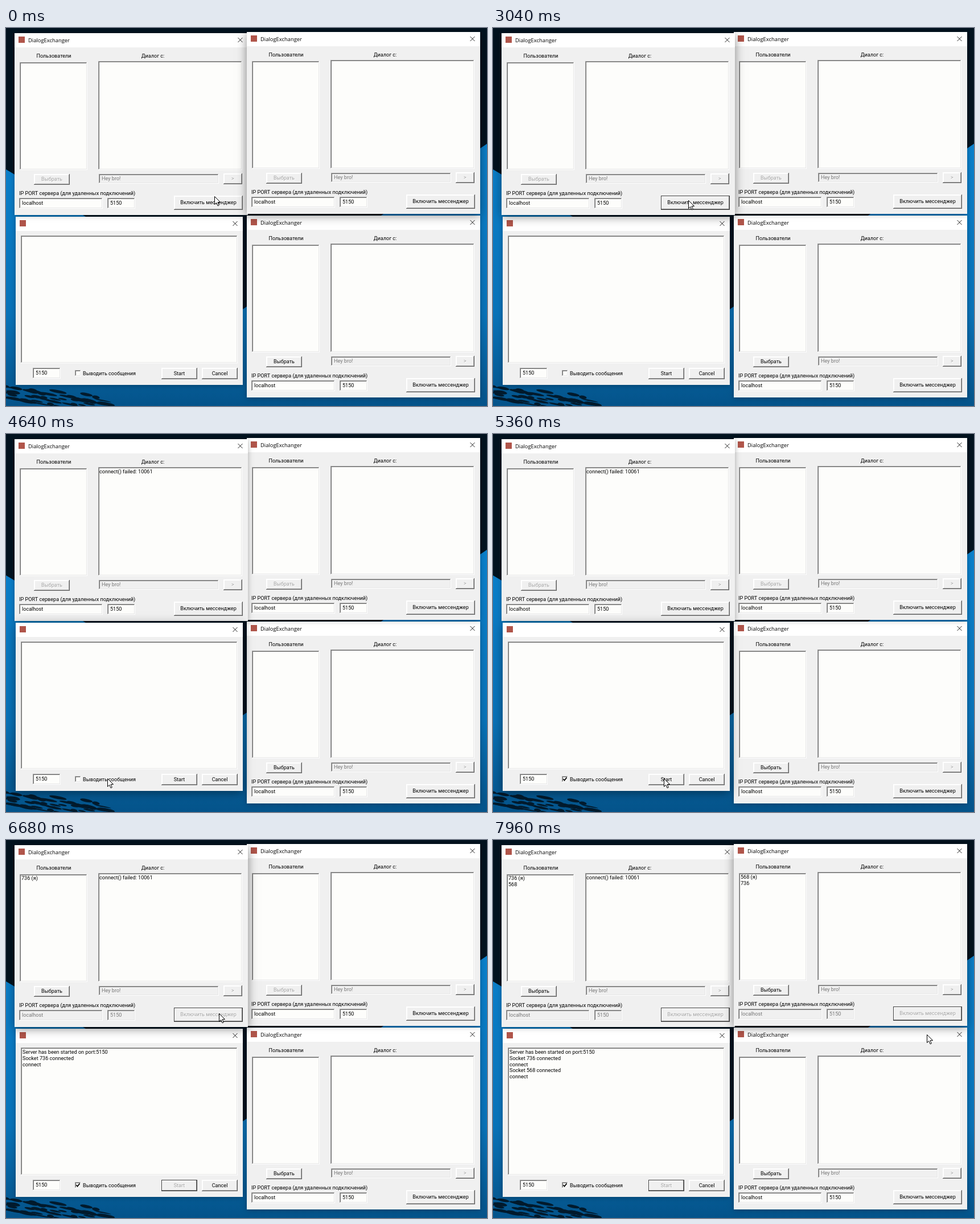
Recreate the animation shown at these times as an HTML page with a canvas. Size 845 px wide and 663 px high, loop 8000 ms.

```html
<!DOCTYPE html>
<html lang="ru">
<head>
<meta charset="utf-8">
<title>Messenger windows</title>
<style>
html, body { margin: 0; width: 100%; height: 100%; overflow: hidden; background: #01121f; }
canvas { display: block; }
</style>
</head>
<body>
<canvas id="stage" width="845" height="663"></canvas>
<script>
const ctx = document.getElementById('stage').getContext('2d');
const LOOP = 8000, STEP = 40, LINE = 10.8;
const UI = '9.1px Roboto, "Noto Sans", sans-serif';
const CAPTION = '9.4px "Open Sans", "Noto Sans", sans-serif';
const FACE = '#f0f0f0', PAPER = '#fdfdfb', INK = '#000';

// Moments of the story
const CONNECT = 1040, FAIL = 3080, HOST = 4640, CHECK = 4920, START = 5480,
  RETRY = 6480, SECOND = 7560, NOTICE = 7800;

const start = { x: 366, y: 295 };
const moves = [
  { from: 40, to: 720, x: 339, y: 309 },
  { from: 3000, to: 3040, x: 343, y: 302 },
  { from: 3040, to: 3840, x: 262, y: 86 },
  { from: 3840, to: 4480, x: 178, y: 604 },
  { from: HOST, to: 4840, x: 126, y: 604 },
  { from: CHECK, to: 5400, x: 303, y: 604 },
  { from: START, to: 6000, x: 355, y: 282 },
  { from: 6000, to: 6320, x: 374, y: 304 },
  { from: 6960, to: 7440, x: 772, y: 304 },
  { from: 7640, to: 7960, x: 762, y: 341 }
];

const smooth = k => k * k * (3 - 2 * k);

function pointerAt(t) {
  let { x, y } = start;
  for (const m of moves) {
    const k = smooth(Math.min(1, Math.max(0, (t - m.from) / (m.to - m.from))));
    x += (m.x - x) * k;
    y += (m.y - y) * k;
  }
  return [Math.round(x), Math.round(y)];
}

function seeded(seed) {
  return () => (seed = seed * 16807 % 2147483647) / 2147483647;
}

function rect(x, y, w, h, color) {
  ctx.fillStyle = color;
  ctx.fillRect(x, y, w, h);
}

function trace(...points) {
  ctx.beginPath();
  points.forEach(p => ctx.lineTo(...p));
}

function fill(color) {
  ctx.closePath();
  ctx.fillStyle = color;
  ctx.fill();
}

function stroke(color, width = 1) {
  ctx.strokeStyle = color;
  ctx.lineWidth = width;
  ctx.stroke();
}

// y is the middle of the line
function text(s, x, y, { color = INK, align = 'left', font = UI } = {}) {
  ctx.font = font;
  ctx.textAlign = align;
  ctx.fillStyle = color;
  ctx.fillText(s, x, y + 3);
}

const lines = (list, x, y) => list.forEach((s, i) => text(s, x, Math.round(y + i * LINE)));

function bevel(x, y, w, h, light, dark) {
  rect(x, y, w, 1, light);
  rect(x, y, 1, h, light);
  rect(x, y + h - 1, w, 1, dark);
  rect(x + w - 1, y, 1, h, dark);
}

function field(x, y, w, h, color = PAPER) {
  rect(x, y, w, h, color);
  bevel(x, y, w, h, '#a0a0a0', '#fff');
  bevel(x + 1, y + 1, w - 2, h - 2, '#707070', '#e6e6e6');
}

function edit(s, x, y, w, h, enabled) {
  field(x, y, w, h, enabled ? PAPER : FACE);
  text(s, x + 5, y + Math.floor(h / 2), { color: enabled ? INK : '#777' });
}

function button(s, x, y, w, h, { enabled = true, focus = false, down = false } = {}) {
  rect(x, y, w, h, FACE);
  bevel(x, y, w, h, focus ? '#404040' : '#fff', focus ? '#404040' : '#606060');
  bevel(x + 1, y + 1, w - 2, h - 2, down ? '#a0a0a0' : '#fff', focus ? '#707070' : '#a0a0a0');
  const cx = x + w / 2 + down, cy = y + Math.floor(h / 2) + down;
  if (!enabled) text(s, cx + 1, cy + 1, { color: '#fff', align: 'center' });
  text(s, cx, cy, { color: enabled ? INK : '#a3a3a3', align: 'center' });
}

function frame(w, h, title, active) {
  ctx.save();
  ctx.shadowColor = `rgba(0,0,0,${active ? 0.45 : 0.3})`;
  ctx.shadowBlur = active ? 16 : 9;
  ctx.shadowOffsetY = active ? 3 : 1;
  rect(0, 0, w, h, FACE);
  ctx.restore();
  rect(0, 0, w, 25, '#fff');
  rect(7, 6, 11, 11, '#b0554a');
  text(title, 24, 13, { font: CAPTION });
  const x = w - 13.5, y = 12, r = 4;
  for (const d of [-r, r]) {
    trace([x - r, y - d], [x + r, y + d]);
    stroke('#222');
  }
}

function client(active, s) {
  frame(410, 319, 'DialogExchanger', active);
  text('Пользователи', 69, 40, { align: 'center' });
  text('Диалог с:', 243, 40, { align: 'center' });
  field(9, 51, 119, 189);
  field(147, 49, 253, 191);
  lines(s.users, 12, 58);
  lines(s.log, 149, 57);
  button('Выбрать', 34, 247, 63, 19, { enabled: s.online });
  edit('Hey bro!', 148, 247, 211, 17, false);
  button('>', 367, 246, 33, 19, { enabled: false });
  text('IP PORT сервера (для удаленных подключений)', 8, 281);
  edit('localhost', 8, 289, 147, 19, !s.online);
  edit('5150', 163, 289, 49, 19, !s.online);
  button('Включить мессенджер', 280, 285, 121, 25, { ...s, enabled: !s.online });
}

function server(active, s) {
  frame(399, 295, '', active);
  field(9, 33, 381, 224);
  lines(s.log, 12, 41);
  edit('5150', 30, 265, 49, 19, true);
  field(104, 269, 11, 11);
  if (s.checked) {
    trace([106.5, 274], [108.5, 276.5], [112.5, 271.5]);
    stroke(INK, 1.8);
  }
  text('Выводить сообщения', 118, 275);
  button('Start', 256, 265, 63, 20, { ...s, enabled: !s.started });
  button('Cancel', 327, 265, 63, 20);
}

function wallpaper() {
  rect(0, 0, 845, 663, '#01121f');
  const blue = ctx.createLinearGradient(0, 200, 0, 663);
  blue.addColorStop(0, '#0a80cc');
  blue.addColorStop(0.65, '#0872b8');
  blue.addColorStop(1, '#04538a');
  trace([0, 248], [415, 494], [845, 203], [845, 663], [0, 663]);
  fill(blue);
  // Rocks along the lower left edge
  const random = seeded(11);
  for (let i = 0; i < 60; i++) {
    const x = 180 * random() ** 1.4, y = 628 + x * 0.1 + random() * 26;
    ctx.beginPath();
    ctx.ellipse(x, y, 5 + random() * 11, 1 + random() * 2, 0.2, 0, 7);
    fill('#021a2c');
  }
}

function pointer([x, y]) {
  ctx.save();
  ctx.translate(x + 0.5, y + 0.5);
  trace([0, 0], [0, 14], [3.2, 11], [5.6, 16.4], [7.8, 15.4], [5.5, 10.2], [10, 10]);
  fill('#fff');
  stroke('#000');
  ctx.restore();
}

function draw(t) {
  const after = ms => t >= ms;
  const pressed = ms => t >= ms && t < ms + 80;
  const until = (...items) => items.filter(([ms]) => after(ms)).map(([, s]) => s);

  const first = {
    users: until([RETRY + 120, '736 (я)'], [NOTICE, '568']),
    log: until([FAIL, 'connect() failed: 10061']),
    online: after(RETRY + 80),
    focus: after(CONNECT) && !after(HOST) || after(RETRY),
    down: pressed(CONNECT + 40) || pressed(RETRY)
  };
  const second = {
    users: until([SECOND + 160, '568 (я)'], [NOTICE, '736']),
    log: [],
    online: after(SECOND + 120),
    focus: after(SECOND),
    down: pressed(SECOND)
  };
  const third = { users: [], log: [] };
  const host = {
    log: until(
      [START + 80, 'Server has been started on port:5150'],
      [RETRY + 80, 'Socket 736 connected'], [RETRY + 120, 'connect'],
      [SECOND + 120, 'Socket 568 connected'], [SECOND + 160, 'connect']),
    checked: after(CHECK),
    started: after(START + 80),
    focus: after(START),
    down: pressed(START)
  };

  const windows = {
    A: { x: 15, y: 9, paint: client, state: first },
    B: { x: 423, y: 7, paint: client, state: second },
    C: { x: 17, y: 331, paint: server, state: host },
    D: { x: 423, y: 329, paint: client, state: third }
  };
  // Each click raises its window to the top
  const raised = until([CONNECT, 'A'], [HOST, 'C'], [RETRY, 'A'], [SECOND, 'B']);
  const order = raised.reduce((all, id) => all.replace(id, '') + id, 'CDAB');

  wallpaper();
  [...order].forEach((id, i) => {
    const { x, y, paint, state } = windows[id];
    ctx.save();
    ctx.translate(x, y);
    paint(i === order.length - 1, state);
    ctx.restore();
  });
  pointer(pointerAt(t));
}

function tick() {
  draw(Math.floor(performance.now() % LOOP / STEP) * STEP);
  requestAnimationFrame(tick);
}
tick();
</script>
</body>
</html>
```
